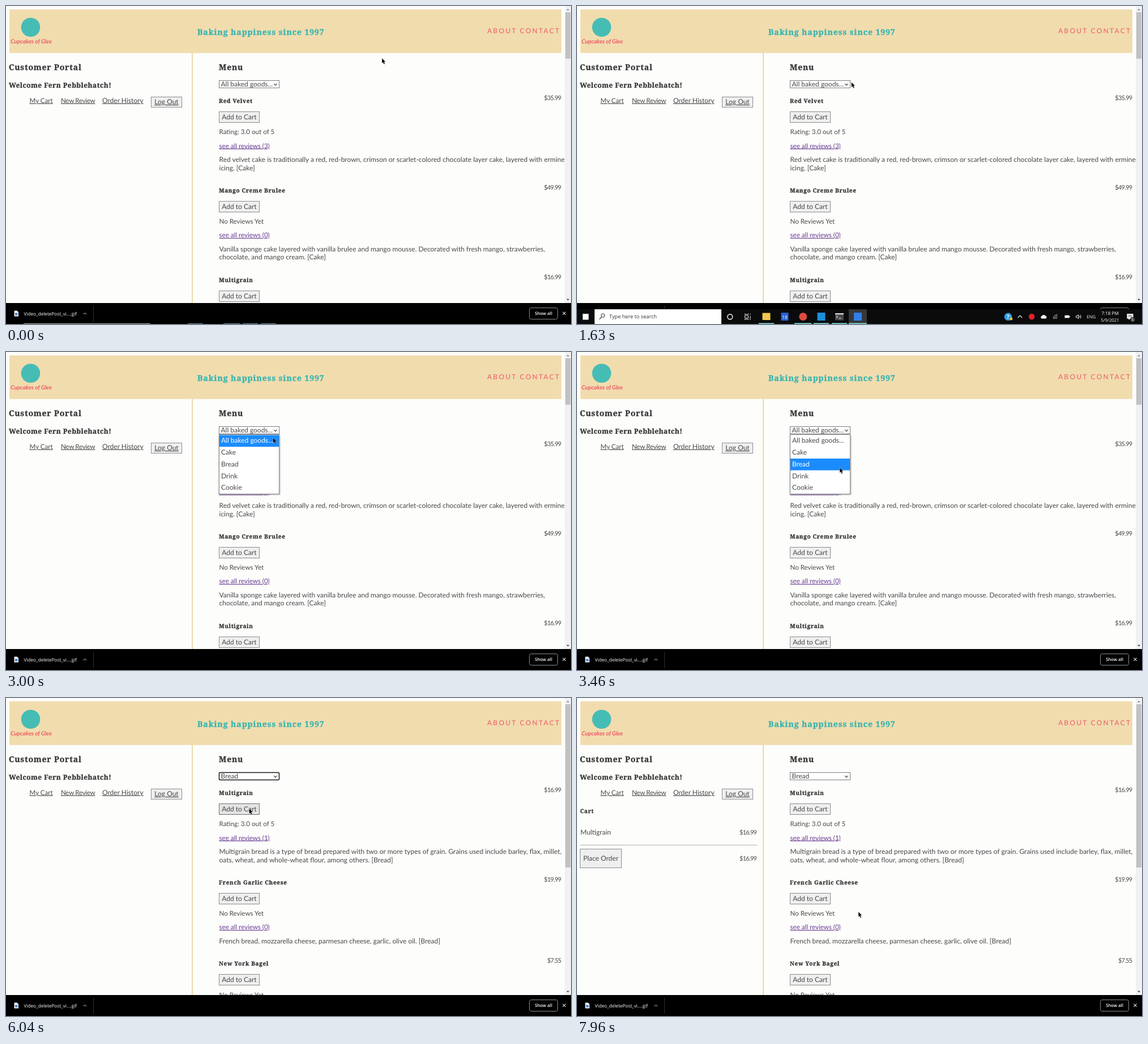
An HTML page for the animation above (8 s loop, 998x561 px).

```html
<!DOCTYPE html>
<html lang="en">
<head>
<meta charset="utf-8">
<title>Bakery menu</title>
<style>
html, body { margin: 0; width: 100%; height: 100%; overflow: hidden; background: #fdfdfc; }
svg { display: block; width: 100vw; height: 100vh; text-rendering: geometricPrecision; }
text { white-space: pre; }
.body { font: 12px Lato, sans-serif; fill: #484848; }
.small { font: 11.6px Lato, sans-serif; fill: #484848; }
.price { font: 11px Lato, sans-serif; letter-spacing: -.7px; fill: #484848; }
.link { text-decoration: underline; text-decoration-thickness: 1px; }
.seen { fill: #66388f; }
.slab { font: 700 10px "Noto Serif", serif; letter-spacing: .65px; fill: #333; stroke: #333; stroke-width: .3px; }
.mid { font-size: 12px; letter-spacing: .45px; }
.big { font-size: 14px; letter-spacing: .82px; }
.tag { font-size: 14px; letter-spacing: .94px; fill: #35b5b0; stroke: #35b5b0; }
.nav { font: 12px Lato, sans-serif; letter-spacing: 2.25px; fill: #ee5a66; }
.brand { font: italic 700 10.2px Lato, sans-serif; fill: #ee5a66; }
.ui { font: 8.2px "Open Sans", sans-serif; fill: #fff; }
</style>
</head>
<body>
<svg id="stage" viewBox="0 0 998 561" preserveAspectRatio="none">
  <defs>
    <clipPath id="view"><rect width="998" height="524"/></clipPath>
    <filter id="soft" x="-10%" y="-10%" width="120%" height="120%"><feGaussianBlur stdDeviation="1"/></filter>
  </defs>
</svg>
<script>
const NS = 'http://www.w3.org/2000/svg';
const stage = document.getElementById('stage');

function add(parent, tag, attrs, content) {
  const node = document.createElementNS(NS, tag);
  for (const key in attrs) node.setAttribute(key, attrs[key]);
  if (content !== undefined) node.textContent = content;
  parent.appendChild(node);
  return node;
}
const group = (p, attrs = {}) => add(p, 'g', attrs);
const text = (p, x, y, s, cls = 'body', more = {}) => add(p, 'text', { x, y, class: cls, ...more }, s);
const rect = (p, x, y, width, height, fill, more = {}) => add(p, 'rect', { x, y, width, height, fill, ...more });
const dot = (p, cx, cy, r, fill, more = {}) => add(p, 'circle', { cx, cy, r, fill, ...more });
const line = (p, d, stroke, width = 1, more = {}) =>
  add(p, 'path', { d, stroke, 'stroke-width': width, fill: 'none', ...more });
const show = (node, on) => node.setAttribute('display', on ? 'inline' : 'none');

function button(p, x, y, w, h, label) {
  const face = rect(p, x + .5, y + .5, w - 1, h - 1, '#efefef', { stroke: '#8c8c8c' });
  text(p, x + w / 2, y + h / 2 + 3.5, label, 'body', { 'text-anchor': 'middle' });
  return face;
}

// One menu entry; y is the baseline of its name.
function item(p, y, name, cost, rating, count, lines) {
  text(p, 376, y, name, 'slab');
  text(p, 980.5, y - 5, cost, 'price', { 'text-anchor': 'end' });
  const face = button(p, 376, Math.round(y + 15), 72, 20, 'Add to Cart');
  text(p, 376.5, y + 55.3, rating, 'small');
  text(p, 376.5, y + 79.5, `see all reviews (${count})`, 'small link seen');
  lines.forEach((s, i) => text(p, 376.5, y + 104 + i * 14.6, s));
  return face;
}

// Page
const page = group(stage, { 'clip-path': 'url(#view)' });
rect(page, 0, 0, 998, 524, '#fdfdfc');
rect(page, 6, 6, 975, 77, '#f1dcae');
dot(page, 43.5, 37.5, 16.8, '#45bdb5');
text(page, 44.5, 66, 'Cupcakes of Glee', 'brand', { 'text-anchor': 'middle' });
text(page, 338, 50.5, 'Baking happiness since 1997', 'slab tag');
text(page, 850, 48, 'ABOUT CONTACT', 'nav');
rect(page, 328, 83, 2, 441, '#ecd9a4');

text(page, 5, 113, 'Customer Portal', 'slab big');
text(page, 5, 143.7, 'Welcome Fern Pebblehatch!', 'slab mid');
text(page, 41.5, 170.7, 'My Cart', 'small link');
text(page, 97, 170.7, 'New Review', 'small link', { 'letter-spacing': -.3 });
text(page, 170, 170.7, 'Order History', 'body link');
rect(page, 256.5, 160.5, 54, 18, '#efefef', { stroke: '#8c8c8c' });
text(page, 283.5, 173, 'Log Out', 'body link', { 'text-anchor': 'middle' });
text(page, 376, 113, 'Menu', 'slab big');

const cart = group(page);
text(cart, 5.5, 203, 'Cart', 'slab');
text(cart, 6, 240.6, 'Multigrain');
text(cart, 317.3, 240.6, '$16.99', 'price', { 'text-anchor': 'end' });
rect(cart, 6, 259, 312, 1, '#b0b0b0');
button(cart, 5, 266, 74, 34, 'Place Order');
text(cart, 317.3, 286.6, '$16.99', 'price', { 'text-anchor': 'end' });

const all = group(page);
item(all, 171, 'Red Velvet', '$35.99', 'Rating: 3.0 out of 5', 3, [
  'Red velvet cake is traditionally a red, red-brown, crimson or scarlet-colored chocolate layer cake, layered with ermine',
  'icing. [Cake]']);
item(all, 328.7, 'Mango Creme Brulee', '$49.99', 'No Reviews Yet', 0, [
  'Vanilla sponge cake layered with vanilla brulee and mango mousse. Decorated with fresh mango, strawberries,',
  'chocolate, and mango cream. [Cake]']);
item(all, 487, 'Multigrain', '$16.99', '', 1, []);

const bread = group(page);
const buy = item(bread, 171, 'Multigrain', '$16.99', 'Rating: 3.0 out of 5', 1, [
  'Multigrain bread is a type of bread prepared with two or more types of grain. Grains used include barley, flax, millet,',
  'oats, wheat, and whole-wheat flour, among others. [Bread]']);
item(bread, 328.7, 'French Garlic Cheese', '$19.99', 'No Reviews Yet', 0, [
  'French bread, mozzarella cheese, parmesan cheese, garlic, olive oil. [Bread]']);
item(bread, 472.4, 'New York Bagel', '$7.55', 'No Reviews Yet', 0, []);

// Scrollbar
rect(page, 987, 0, 11, 524, '#f1f1f3');
const thumb = rect(page, 988, 11, 9, 82, '#c1c1c1');
add(page, 'path', { d: 'M990 7.5h5l-2.5-2.6z', fill: '#777' });
add(page, 'path', { d: 'M990 516.8h5l-2.5 2.6z', fill: '#444' });

// Select box and its list
const box = rect(page, 376.5, 131.5, 106, 13, '#fff', { stroke: '#7c7c7c' });
const choice = text(page, 379.5, 142, '');
line(page, 'M473.2 137.2l2.7 2.7 2.7-2.7', '#333', 1.1);

const shadow = line(page, 'M376.8 147V251H483.2V147', '#8c8c8c', 1.6, { filter: 'url(#soft)' });
const list = group(page);
rect(list, 376.5, 145.5, 106, 105, '#fff', { stroke: '#8a8a8a' });
const mark = rect(list, 377, 146.5, 105, 20.7, '#1a8cff');
const options = ['All baked goods...', 'Cake', 'Bread', 'Drink', 'Cookie']
  .map((s, i) => text(list, 380, 160.4 + i * 20.75, s));

// Download shelf
const shelf = group(stage);
rect(shelf, 0, 524, 998, 37, '#000');
add(shelf, 'path', { d: 'M14.5 537.5h5l2.5 2.5v7.5h-7.5z', fill: '#f4f4f4' });
rect(shelf, 16, 541.5, 4.5, 4, '#3d7fd0');
text(shelf, 31.5, 545.7, 'Video_deletePost_vi....gif', 'ui');
line(shelf, 'M136.8 544l2.6-2.6 2.6 2.6', '#ddd');
rect(shelf, 154, 529, 1, 28, '#2f2f33');
rect(shelf, 924.5, 532.5, 50, 20, '#000', { rx: 3, stroke: '#8a8d91' });
text(shelf, 949.5, 545.2, 'Show all', 'ui', { 'text-anchor': 'middle', style: 'font-weight:600;font-size:7.7px' });
line(shelf, 'M983.4 539.7l5.2 5.2M988.6 539.7l-5.2 5.2', '#e4e4e4', 1.1);

// Taskbar: a thin edge while hidden, then the whole strip
const running = [[321, 27], [384, 30], [418, 27], [450, 27]];
const edge = group(stage);
rect(edge, 31, 560, 224, 1, '#b9b9b0');
running.forEach(([x, w]) => rect(edge, x, 560, w, 1, '#6f9a9c'));

const tasks = group(stage);
rect(tasks, 0, 535, 998, 26, '#0b0b0c');
rect(tasks, 10, 543, 10.5, 10.5, '#fff');
rect(tasks, 31, 535, 224, 26, '#fff');
dot(tasks, 45.8, 546, 3.1, 'none', { stroke: '#222' });
line(tasks, 'M43.6 548.4l-4 4.2', '#222', 1.2);
text(tasks, 57, 551.3, 'Type here to search', 'ui', { style: 'font-size:9.2px;fill:#333' });
dot(tasks, 270.3, 548.2, 4.5, 'none', { stroke: '#fff', 'stroke-width': 1.4 });
line(tasks, 'M296.5 542.5v1.5h6v-1.5M296.5 554v-1.5h6v1.5M296.5 546h6v4.5h-6zM306 542.5v2M306 547v7', '#e8e8e8');
rect(tasks, 327.5, 541.5, 14, 12.5, '#f5c64f');
rect(tasks, 360.5, 541, 13, 14, '#2b62d0');
text(tasks, 367, 551.8, '18', 'ui', { 'text-anchor': 'middle' });
dot(tasks, 399.3, 548, 7, '#dd4b3e');
rect(tasks, 424.5, 541, 14, 14, '#1b8fdc');
rect(tasks, 456, 542, 15, 12.5, '#45484c');
rect(tasks, 456, 542, 15, 2.2, '#dcdcdc');
line(tasks, 'M458 546.3l2.5 2-2.5 2M462.5 551h4', '#fff');
rect(tasks, 480, 535, 32, 26, '#35373a');
rect(tasks, 489, 541, 14, 14, '#2f7fe6');
running.concat([[480, 32]]).forEach(([x, w]) => rect(tasks, x, 559.3, w, 1.7, '#79cfc9'));

dot(tasks, 761.5, 548.3, 6.8, '#2f9fe0');
text(tasks, 761.5, 552, '?', 'ui', { 'text-anchor': 'middle', style: 'font-size:10px;font-weight:700' });
dot(tasks, 767, 552, 2.4, '#f4c430');
line(tasks, 'M778.6 550l3.8-3.8 3.8 3.8', '#fff', 1.1);
dot(tasks, 803.2, 548, 5.2, '#e3222a');
add(tasks, 'path', { d: 'M821 551.5a2.4 2.4 0 0 1 .3-4.7a3.3 3.3 0 0 1 5.7-.4a2.6 2.6 0 0 1 .6 5.1z', fill: '#fff' });
line(tasks, 'M841.5 552a7 7 0 0 1 7-7.5M844 552a4.6 4.6 0 0 1 4.5-5M846.4 552a2.4 2.4 0 0 1 2.1-2.5', '#d8d8d8');
rect(tasks, 861.5, 545.7, 8, 4.6, '#fff');
rect(tasks, 869.5, 547, 1.3, 2, '#fff');
line(tasks, 'M881.5 546.7h1.8l2.2-2v7l-2.2-2h-1.8zM887.2 546.3q1.4 1.8 0 3.6M889 544.9q2.6 3.2 0 6.4', '#fff', .9);
text(tasks, 908.3, 551, 'ENG', 'ui', { 'text-anchor': 'middle', style: 'font-size:7.6px' });
text(tasks, 941.5, 544.6, '7:18 PM', 'ui', { 'text-anchor': 'middle' });
text(tasks, 941.5, 556.6, '5/9/2021', 'ui', { 'text-anchor': 'middle', style: 'font-size:7.8px' });
add(tasks, 'path', { d: 'M971.5 543h11v8.5h-5.5l-2.5 2.5v-2.5h-3z', fill: '#fff' });
line(tasks, 'M973.5 545.6h7M973.5 548h7', '#222', .8);
dot(tasks, 981.5, 553, 4.3, '#3a3d40');
text(tasks, 981.5, 555.6, '5', 'ui', { 'text-anchor': 'middle', style: 'font-size:7px' });

const cursor = add(stage, 'path', {
  d: 'M0 0V9.2L2 7.4L3.6 10.9L5.3 10.1L3.8 6.7H6.6Z', fill: '#000', stroke: '#fff', 'stroke-width': .4
});

// Pointer legs: start, end, destination and optional bend point
const legs = [
  { from: 960, to: 1750, x: 473, y: 137 },
  { from: 1790, to: 1830, x: 474, y: 135 },
  { from: 2790, to: 3460, x: 464, y: 204 },
  { from: 5750, to: 6040, x: 429.5, y: 195 },
  { from: 7330, to: 7960, x: 497, y: 377, bend: [575, 265] }
];
const ease = p => p * p * (3 - 2 * p);

function pointer(t) {
  let x = 664, y = 92;
  for (const leg of legs) {
    if (t < leg.from) break;
    const p = ease(Math.min(1, (t - leg.from) / (leg.to - leg.from)));
    const [bx, by] = leg.bend || [(x + leg.x) / 2, (y + leg.y) / 2];
    const curve = (a, b, c) => a * (1 - p) ** 2 + 2 * b * p * (1 - p) + c * p * p;
    x = curve(x, bx, leg.x);
    y = curve(y, by, leg.y);
  }
  return [x, y];
}

function render(t) {
  const [x, y] = pointer(t);
  cursor.setAttribute('transform', `translate(${x} ${y})`);

  show(edge, t < 40);
  show(tasks, t >= 40 && t < 2040);
  const rise = Math.min(1, Math.max(0, t / 170));
  tasks.setAttribute('transform', `translate(0 ${26 * (1 - rise) ** 2})`);

  const picked = t >= 4000;
  show(all, !picked);
  show(bread, picked);
  thumb.setAttribute('height', picked ? 288 : 82);
  choice.textContent = options[picked ? 2 : 0].textContent;

  const ring = picked && t < 6130;
  box.setAttribute('stroke', ring ? '#181818' : '#7c7c7c');
  box.setAttribute('stroke-width', ring ? 1.5 : 1);
  box.setAttribute('rx', ring ? 1.5 : 0);

  show(shadow, t >= 2040 && !picked);
  show(list, t >= 2080 && !picked);
  list.setAttribute('opacity', t < 2130 ? .6 : 1);
  const row = Math.max(0, Math.min(4, Math.floor((y - 146.5) / 20.75)));
  mark.setAttribute('y', 146.5 + row * 20.75);
  options.forEach((o, i) => { o.style.fill = i === row ? '#fff' : ''; });

  const over = picked && x >= 376 && x < 448 && y >= 186 && y < 206;
  const pressed = t >= 6130 && t < 6210;
  buy.setAttribute('fill', pressed ? '#f5f5f5' : over ? '#e3e3e3' : '#efefef');
  buy.setAttribute('stroke', over && !pressed ? '#707070' : '#8c8c8c');
  show(cart, t >= 6500);
}

const begin = performance.now();
function tick() {
  render((performance.now() - begin) % 8000);
  requestAnimationFrame(tick);
}
tick();
</script>
</body>
</html>
```
